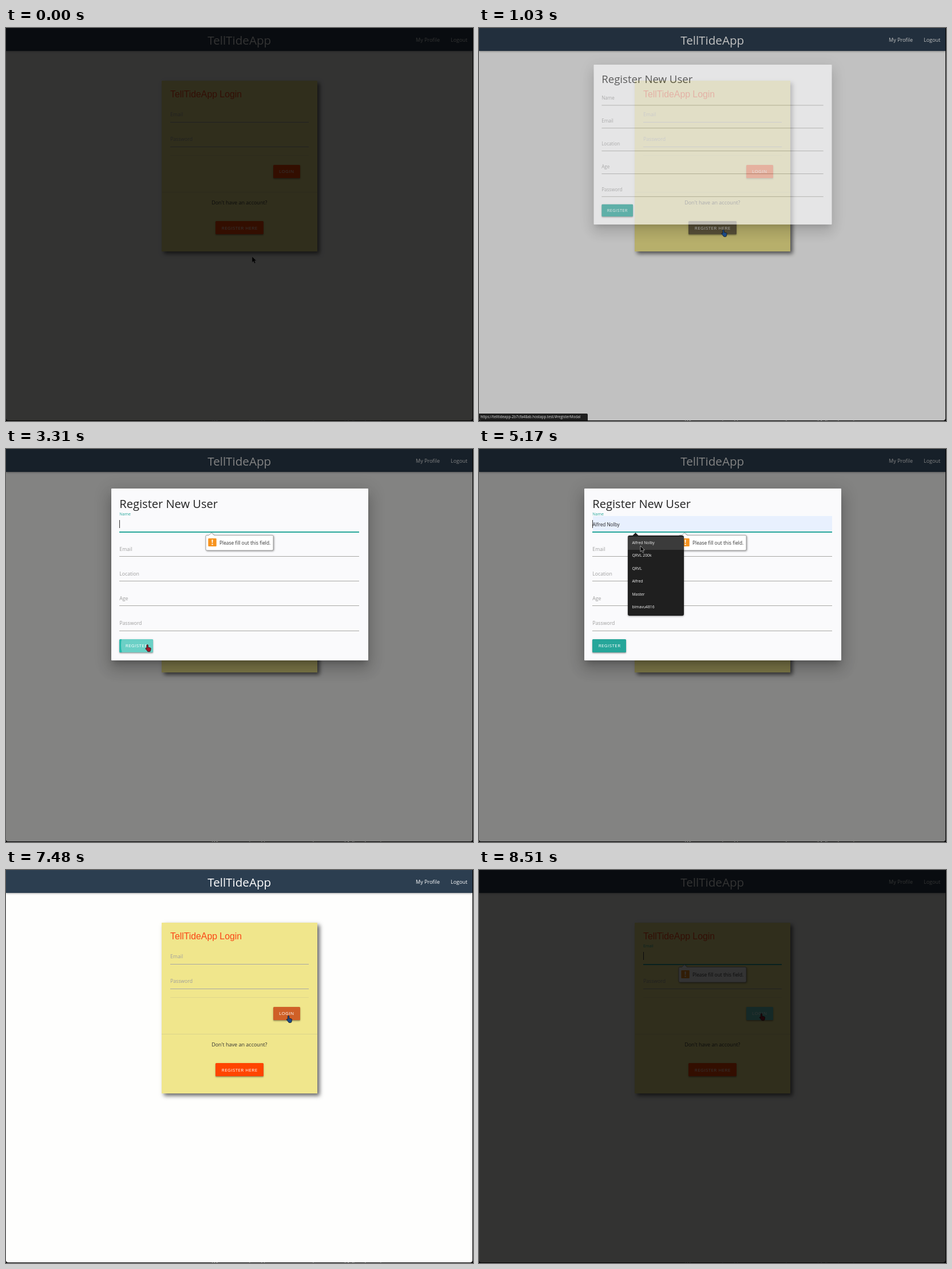
These frames come from a looping animation (816 px wide and 686 px high, 8.55 s). An HTML page:

```html
<!DOCTYPE html>
<html lang="en">
<head>
<meta charset="utf-8">
<title>Login and register</title>
<style>
html, body { margin: 0; width: 100%; height: 100%; overflow: hidden; background: #000; }
body { position: relative; font-family: "Open Sans", "Noto Sans", sans-serif; }
div, svg { position: absolute; }
#page { left: 0; top: 0; width: 815px; height: 685px; overflow: hidden; background: #fefefd; border-radius: 0 0 4px 4px; }
#overlay, #fade { left: 0; top: 0; width: 816px; height: 686px; background: #000; }
.text { line-height: 30px; margin-top: -15px; white-space: nowrap; }
.mid { transform: translateX(-50%); }
.btn { border-radius: 1.5px; overflow: hidden; box-shadow: 0 1px 1.5px rgba(0,0,0,.2), 0 2px 2px rgba(0,0,0,.15), 0 1px 4px rgba(0,0,0,.12); }
.btn .text { color: #fff; font-size: 8px; letter-spacing: .4px; }
.ripple { border-radius: 50%; background: #fff; }
#nav { background: #2c3e50; box-shadow: 0 1px 3px rgba(0,0,0,.35); }
#card { background: #f0e68c; box-shadow: 4px 4px 7px #666; }
#modal { background: #fafafc; border-radius: 1px; box-shadow: 0 15px 24px 2px rgba(0,0,0,.14), 0 6px 29px 5px rgba(0,0,0,.12), 0 7px 9px -4px rgba(0,0,0,.2); }
#status { background: #1f1f1f; border-radius: 0 2px 0 0; }
#list { background: #1f1f1f; border-radius: 3px; box-shadow: 0 1px 3px rgba(0,0,0,.4); }
#edge { left: 360px; top: 684px; width: 326px; height: 2px; overflow: hidden; font-size: 9px; line-height: 9px; color: #999; white-space: nowrap; }
svg { left: 0; top: 0; overflow: visible; }
</style>
</head>
<body>
<div id="page"></div>
<div id="edge">When you are signed in you can post to other users and follow the topics</div>
<div id="fade"></div>
<script>
const LOOP = 8550;
const APP = "TellTideApp";
const page = document.getElementById("page");
const fade = document.getElementById("fade");
const ORANGE = [255, 69, 0], TEAL = [38, 166, 154], HOVER = [43, 187, 173], FOCUS = [29, 125, 116];

function box(parent, x, y, w, h, color, id) {
  const el = document.createElement("div");
  if (id) el.id = id;
  el.style.cssText = `left:${x}px;top:${y}px;width:${w}px;height:${h}px`;
  if (color) el.style.background = color;
  parent.append(el);
  return el;
}

function text(parent, x, y, size, str, color, centered) {
  const el = document.createElement("div");
  el.className = centered ? "text mid" : "text";
  el.style.cssText = `left:${x}px;top:${y}px;font-size:${size}px`;
  if (color) el.style.color = color;
  el.textContent = str;
  parent.append(el);
  return el;
}

function button(parent, x, y, w, h, label) {
  const el = box(parent, x, y, w, h);
  el.className = "btn";
  const wave = box(el, 0, 0, 0, 0);
  wave.className = "ripple";
  text(el, w / 2 + .2, h / 2, 8, label, "#fff", true);
  return { el, wave };
}

function field(parent, x, y, w, label) {
  return {
    y,
    label: text(parent, x, y - 13.2, 8.7, label, "#9e9e9e"),
    line: box(parent, x, y - .5, w, 1, "#a8a8a4"),
    caret: box(parent, x, y - 21, 1, 14, "#333")
  };
}

function svg(parent, markup) {
  const el = document.createElementNS("http://www.w3.org/2000/svg", "svg");
  el.setAttribute("width", 1);
  el.setAttribute("height", 1);
  el.innerHTML = markup;
  parent.append(el);
  return el;
}

// Value of a list of [time, value] steps, linear or eased between them.
const smooth = p => p * p * (3 - 2 * p);
function track(t, steps, ease = p => p) {
  if (t <= steps[0][0]) return steps[0][1];
  for (let i = 1; i < steps.length; i++) {
    const [t0, a] = steps[i - 1], [t1, b] = steps[i];
    if (t < t1) return a + (b - a) * ease((t - t0) / (t1 - t0));
  }
  return steps[steps.length - 1][1];
}
const mix = (a, b, p) => `rgb(${a.map((v, i) => Math.round(v + (b[i] - v) * p))})`;
const show = (el, on) => { el.style.display = on ? "" : "none"; };
const span = (t, from, length) => Math.min(1, Math.max(0, (t - from) / length));
const easeOut = (p, n) => 1 - (1 - p) ** n;

// Page
box(page, 0, 0, 815, 40, "", "nav");
text(page, 407.7, 20.5, 20.6, APP, "#fff", true);
text(page, 716, 20.5, 9, "My Profile", "#fff");
text(page, 777, 20.5, 9, "Logout", "#fff");

box(page, 272, 92, 272, 297.5, "", "card");
const heading = text(page, 287, 115.5, 15.8, APP + " Login", "#fa4616");
heading.style.fontFamily = '"Liberation Sans", Arial, sans-serif';
const loginEmail = field(page, 287, 164.3, 242, "Email");
const loginPass = field(page, 287, 207.5, 242, "Password");
show(loginPass.caret, false);
box(page, 287, 222, 242, 1, "rgba(160,160,140,.22)");
box(page, 272, 286, 272, 1, "rgba(160,160,140,.28)");
const login = button(page, 466.5, 238.5, 47, 23.3, "LOGIN");
text(page, 407.8, 304.5, 9, "Don't have an account?", "#333", true);
const opener = button(page, 366, 337, 84, 23.3, "REGISTER HERE");

const overlay = box(page, 0, 0, 816, 686, "", "overlay");

// Register dialog; its contents use page coordinates
const modal = box(page, 183.5, 68.6, 449, 300.5, "", "modal");
const inner = box(modal, -183.5, -68.6, 816, 686);
text(inner, 198.3, 96, 20.1, "Register New User", "#222");
const fill = box(inner, 198.5, 117, 418.5, 28, "#e8f0fe");
const fields = ["Name", "Email", "Location", "Age", "Password"].map((name, i) =>
  field(inner, 198.3, 144.6 + i * 43.1, 418.7, name));
fields.slice(1).forEach(f => show(f.caret, false));
const name = fields[0];
const typed = text(inner, 198.5, 131.5, 8.2, "", "#222");
const submit = button(inner, 198.3, 331.5, 59.2, 23, "REGISTER");

const status = box(page, 0, 673, 190, 13, "", "status");
text(status, 2.5, 6.3, 6.3, "https://telltideapp-2b7cfa48ab.hostapp.test/#registerModal", "#ddd");

// Validation bubble
const bubble = box(page, 0, 0, 0, 0);
bubble.style.filter = "drop-shadow(1.5px 1.5px 1.5px rgba(0,0,0,.4))";
svg(bubble, `<path d="M351 150.5H354.5L359 146.3L363.5 150.5H465Q467 150.5 467 152.5V175Q467 177 465 177H351Q349 177 349 175V152.5Q349 150.5 351 150.5Z" fill="#fff" stroke="#8f8f8f" stroke-width=".8"/>
<rect x="353.3" y="156" width="14.4" height="14" rx="1" fill="#f7931e"/>
<path d="M359.4 158.2h2.2l-.4 5.8h-1.4zM359.4 165.4h2.2v2.1h-2.2z" fill="#fff"/>`);
text(bubble, 373, 163.8, 8.35, "Please fill out this field.", "#333");

// Suggestion list
const choices = ["Alfred Nolby", "QRVL 200k", "QRVL", "Alfred", "Master", "bimavu4816"];
const list = box(page, 260.3, 151, 98, 140, "", "list");
svg(list, '<path d="M8 .5L13.5 -5L19 .5Z" fill="#1f1f1f"/>');
const marked = box(list, 0, 2, 98, 22.5, "#3b3b3b");
choices.forEach((c, i) => text(list, 7.2, 12.7 + i * 22.5, 6.8, c, "#f2f2f2"));

// Pointer shapes, each with its hot spot at 0,0
const pointer = svg(page, `<path d="M0 0V10.2L2.4 8L4 11.8L5.9 11L4.3 7.3H7.4Z" fill="#000" stroke="#eee" stroke-width=".6"/>
<path transform="translate(-3.8 -.6)" d="M3.2.8c1.2-.5 1.9.2 1.9 1.2v3.2l3.6.8c1 .3 1.3 1 1.2 2l-.6 3.2c-.2.9-.6 1.6-1.4 1.6H4.6C3.6 11.8 2.5 9.6.6 8c-.5-1 .5-1.8 1.6-1l.4.4V2c0-.6.2-1 .6-1.2z" fill="#123" stroke="#111" stroke-width=".7"/>
<path d="M-2 -6H2M0 -6V6M-2 6H2" fill="none" stroke="#222" stroke-width=".9"/>`);
const [arrow, hand, beam] = pointer.children;

const moves = [
  [0, 430, 399], [350, 430, 399], [860, 427, 352], [1350, 427, 352], [2370, 251, 347],
  [2510, 251, 347], [2850, 247, 341.5], [3450, 247, 341.5], [4180, 268.5, 131], [4620, 268.5, 131],
  [4960, 282, 169], [5170, 282, 169], [5340, 284, 195], [5510, 284, 195], [6080, 252, 439],
  [6380, 252, 439], [7440, 493.5, 255], [7600, 493.5, 250.5]
];
const path = axis => moves.map(m => [m[0], m[axis]]);
const pathX = path(1), pathY = path(2);

function setFocus(f, p) {
  f.label.style.top = f.y - 13.2 - 17.8 * p + "px";
  f.label.style.fontSize = 8.7 - 1.7 * p + "px";
  f.label.style.color = mix([158, 158, 158], TEAL, p);
  f.line.style.background = mix([168, 168, 164], TEAL, p);
  f.line.style.height = 1 + .8 * p + "px";
  show(f.caret, p > .1);
}

function setRipple(wave, x, y, r, alpha) {
  wave.style.cssText = `left:${x - r}px;top:${y - r}px;width:${2 * r}px;height:${2 * r}px;opacity:${alpha}`;
}

function draw(t) {
  const light = Math.min(1, .2 + t / 556, .2 + Math.max(0, 8510 - t) / 556);
  fade.style.opacity = 1 - light;

  // Dialog opens and closes in 250 ms
  const opening = span(t, 960, 250), closing = span(t, 6153, 250);
  const open = t < 6153 ? easeOut(opening, 3) : 1 - easeOut(closing, 3);
  overlay.style.opacity = .488 * (t < 6153 ? easeOut(opening, 2) : 1 - easeOut(closing, 4));
  modal.style.opacity = open;
  modal.style.top = 686 * (.04 + .06 * open) + "px";
  modal.style.transform = open < 1 ? `scale(${.8 + .2 * open})` : "none";
  show(modal, open > 0);

  opener.el.style.background = mix(ORANGE, FOCUS, track(t, [[890, 0], [1030, .62], [1100, 1], [6100, 1], [6150, 0]]));
  submit.el.style.background = mix(TEAL, HOVER, track(t, [[2340, 0], [2480, 1], [3480, 1], [3640, 0]]));
  login.el.style.background = mix(ORANGE, HOVER, track(t, [[7440, 0], [7480, .22], [7640, 1]]));
  setRipple(submit.wave, 48.7, 11, track(t, [[2950, 0], [3310, 46], [3450, 62]]),
    track(t, [[3360, .3], [3700, 0]]));
  setRipple(login.wave, 27, 13, track(t, [[7600, 0], [7850, 48]]), .3);

  setFocus(name, track(t, [[3040, 0], [3200, 1], [6040, 1], [6150, 0]]));
  setFocus(loginEmail, track(t, [[7690, 0], [7840, 1]]));

  // Suggestions follow the pointer
  const row = t < 4850 || t > 5600 ? -1 : t < 5290 ? 0 : 1;
  show(list, t >= 4240 && t < 6050);
  show(marked, row >= 0);
  marked.style.top = 2 + row * 22.5 + "px";
  show(fill, row >= 0);
  typed.textContent = row < 0 ? "" : choices[row];

  const second = t > 7000;
  bubble.style.top = second ? "19.4px" : "0";
  bubble.style.opacity = track(t, [[3090, 0], [3240, 1], [6030, 1], [6120, 0], [7710, 0], [7860, 1]]);
  status.style.opacity = track(t, [[870, 0], [950, 1], [1500, 1], [1680, 0]]);

  const x = track(t, pathX, smooth), y = track(t, pathY, smooth);
  pointer.style.transform = `translate(${x}px,${y}px)`;
  const overButton = t > 840 && t < 1380 || t > 2330 && t < 3560 || t > 7400;
  const overField = t > 4080 && t < 4700;
  show(hand, overButton);
  show(beam, overField);
  show(arrow, !overButton && !overField);
  const pressed = t > 2950 && t < 3500 || t > 7600;
  hand.setAttribute("fill", pressed ? "#a3182b" : "#1c4a86");
}

const start = performance.now();
function tick() {
  draw((performance.now() - start) % LOOP);
  requestAnimationFrame(tick);
}
tick();
</script>
</body>
</html>
```
